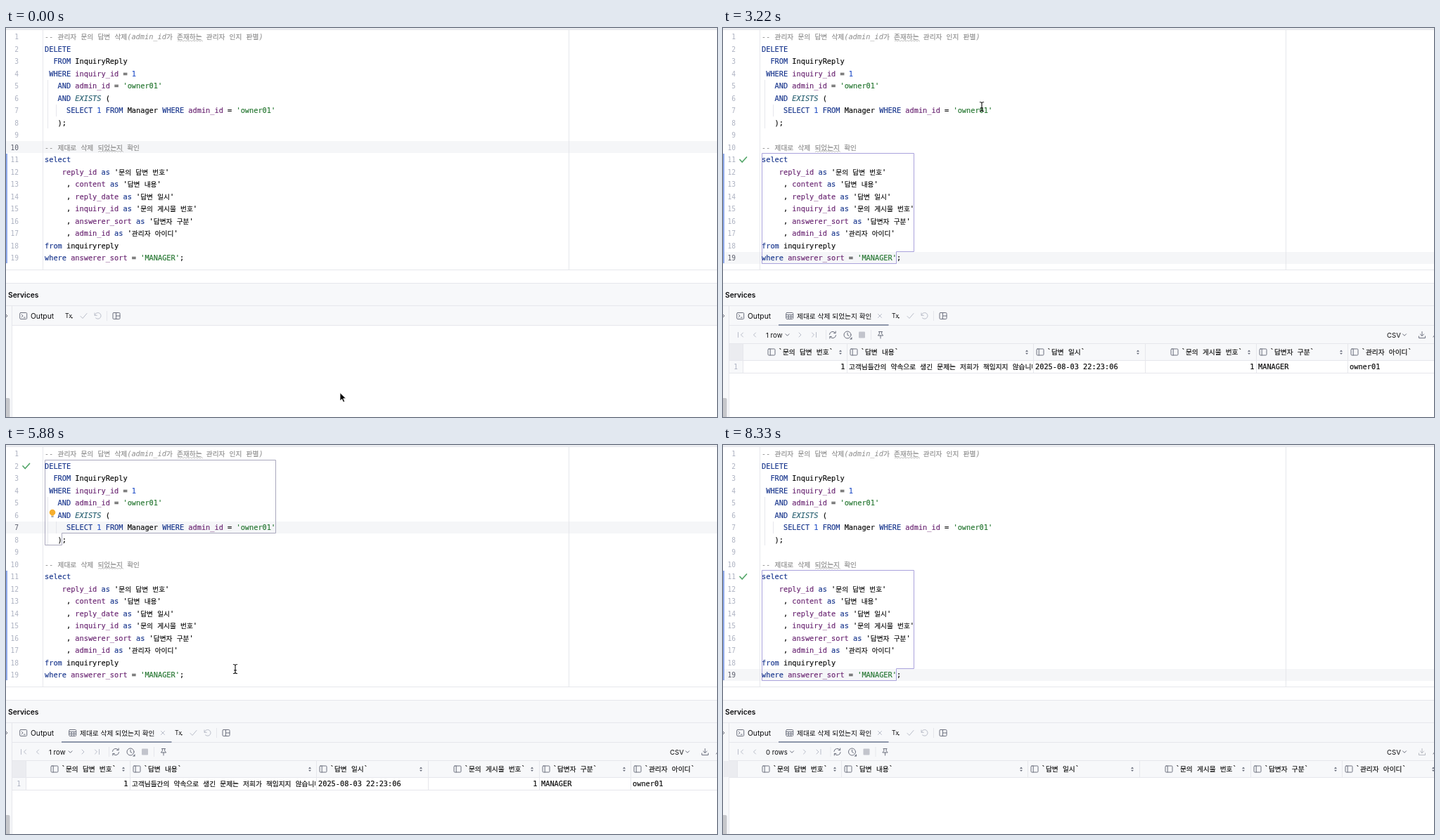
Animation of 1011x554 px, one loop 8.82 s. Source, as an HTML page:

```html
<!DOCTYPE html>
<html lang="ko">
<head>
<meta charset="utf-8">
<title>SQL console</title>
<style>
html, body { margin: 0; width: 100%; height: 100%; overflow: hidden; background: #fff; }
svg { display: block; width: 1011px; height: 554px; }
text { white-space: pre; }
.mono { font: 10.29px "DejaVu Sans Mono", "Noto Sans Mono", monospace; color: #080808; }
.mono, .mono tspan { fill: currentColor; stroke: currentColor; stroke-width: .15; }
.ui { font: 10.3px Inter, sans-serif; fill: #0c0c0e; }
.bold { font-weight: 600; }
.ko { font-family: "Noto Sans CJK KR", "Noto Sans CJK JP", "Noto Sans CJK", sans-serif; font-size: 9.67px; font-style: normal; font-weight: 500; }
.mono .kw { color: #16348c; }
.mono .col { color: #692471; }
.mono .str { color: #23752f; }
.mono .num { color: #2450c8; }
.mono .fn { color: #265f70; font-style: italic; }
.mono .note { color: #8c8c8c; font-style: italic; stroke: none; }
.note .ko { font-weight: 400; }
.mono.no { font-size: 9.6px; color: #aeb3c2; text-anchor: end; stroke: none; }
.mono.no.on { color: #5a5d6b; }
.icon { fill: none; stroke: #6c707e; stroke-width: 1; stroke-linecap: round; stroke-linejoin: round; }
.dim { stroke: #b9bdc9; }
.rule { fill: none; stroke: #e6e7ec; }
</style>
</head>
<body>
<svg id="stage" viewBox="0 0 1011 554" xmlns="http://www.w3.org/2000/svg"></svg>
<script>
const W = 1011, H = 554, LOOP = 8820, STEP = 70, ROW = 17.5;
const USER = 'owner01';
const stage = document.getElementById('stage');

const lines = [
  '-- 관리자 문의 답변 삭제(admin_id가 존재하는 관리자 인지 판별)',
  'DELETE',
  '  FROM InquiryReply',
  ' WHERE inquiry_id = 1',
  `   AND admin_id = '${USER}'`,
  '   AND EXISTS (',
  `     SELECT 1 FROM Manager WHERE admin_id = '${USER}'`,
  '   );',
  '',
  '-- 제대로 삭제 되었는지 확인',
  'select',
  "    reply_id as '문의 답변 번호'",
  "     , content as '답변 내용'",
  "     , reply_date as '답변 일시'",
  "     , inquiry_id as '문의 게시물 번호'",
  "     , answerer_sort as '답변자 구분'",
  "     , admin_id as '관리자 아이디'",
  'from inquiryreply',
  "where answerer_sort = 'MANAGER';"
];

// Markup helpers
const korean = s => s.replace(/[가-힣]+/g, '<tspan class="ko">$&</tspan>');
const text = (x, y, s, cls = 'ui', extra = '') =>
  `<text x="${x}" y="${y}" class="${cls}" ${extra}>${korean(s)}</text>`;
const rect = (x, y, w, h, fill, extra = '') =>
  `<rect x="${x}" y="${y}" width="${w}" height="${h}" fill="${fill}" ${extra}/>`;
const path = (d, cls = 'icon', extra = '') => `<path d="${d}" class="${cls}" ${extra}/>`;
const group = (id, body, extra = '') => `<g id="${id}" ${extra}>${body}</g>`;
const at = (x, y, body) => `<g transform="translate(${x} ${y})">${body}</g>`;
const hline = (y, x = 0, w = W) => path(`M${x} ${y}h${w}`, 'rule');
const vline = (x, y, h) => path(`M${x} ${y}v${h}`, 'rule');
const mid = n => 12.5 + ROW * (n - 1);

const rules = [
  [/^--.*/, 'note'],
  [/^'[A-Za-z0-9]+'/, 'str'],
  [/^'[^']*'/, ''],
  [/^EXISTS\b/, 'fn'],
  [/^(DELETE|FROM|WHERE|AND|SELECT|select|as|from|where)\b/, 'kw'],
  [/^(\w+_(id|date|sort)|content)\b/, 'col'],
  [/^\d+/, 'num'],
  [/^\w+/, ''],
  [/^[^\w']/, '']
];

function paint(line) {
  let out = '';
  while (line) {
    const [re, cls] = rules.find(r => r[0].test(line));
    const token = line.match(re)[0];
    out += cls ? `<tspan class="${cls}">${korean(token)}</tspan>` : korean(token);
    line = line.slice(token.length);
  }
  return out;
}

function squiggle(x, y, w) {
  let d = `M${x} ${y}`;
  for (let i = 0; i < w / 2; i++) d += `l2 ${i % 2 ? 1.4 : -1.4}`;
  return path(d, 'rule', 'style="stroke:#b4b4b4;stroke-width:.8"');
}

// Icons, each centred on its origin
const gridIcon = '<rect x="-5" y="-4.5" width="10" height="9" rx="1.2" class="icon"/>';
const columnIcon = gridIcon + path('M-1.8 -4.5v9');
const tableIcon = gridIcon + path('M-5 -1.5h10M-5 1.5h10M-1.5 -1.5v6M2 -1.5v6');
const layoutIcon = gridIcon + path('M-.5 -4.5v9M-.5 0h5.5');
const outputIcon = gridIcon + path('M-2.6 -2l2 2l-2 2M.6 2.2h2');
const tickIcon = path('M-4 .5l3 3l6 -7', 'icon dim', 'stroke-width="1.2"');
const undoIcon = path('M-4.5 -4v3.3h3.3M-4.2 -1a4.4 4.4 0 1 1 1.2 4', 'icon dim');
const chevron = path('M-2.5 -1.2l2.5 2.5l2.5 -2.5');
const sorter = '<path d="M-2 -.9l2 -2.3l2 2.3zM-2 .9l2 2.3l2 -2.3z" fill="#6c707e"/>';
const refresh = path('M-4.6 -.6a4.6 4.6 0 0 1 8.4 -2M4.6 .6a4.6 4.6 0 0 1 -8.4 2M4.2 -5v2.6h-2.6M-4.2 5v-2.6h2.6');
const clock = '<circle r="5" class="icon"/>' + path('M0 -2.8v3l2 1.2') +
  '<path d="M6.5 3v3.5h-3.5z" fill="#6c707e"/>';
const pin = path('M-2.5 -4.5h5M-1.7 -4.5v3.3l-2 2.2h7.4l-2 -2.2v-3.3M0 1v4');
const download = path('M0 -4.5v6M-2.6 -1l2.6 2.6l2.6 -2.6M-4.5 2v2.5h9v-2.5');
const check = path('M-4.5 0l3.2 3.5l6.3 -7', 'icon', 'style="stroke:#55a76a;stroke-width:1.7"');
const bulb = '<circle r="4.3" cy="-1" fill="#f5ae2e"/>' + rect(-1.8, 2.6, 3.6, 1, '#f5ae2e') +
  rect(-1.6, 4.4, 3.2, 1.2, '#6c707e');

const txTools = at(84, 410, text(0, 3.4, 'Tx', 'ui', 'style="font-size:8.8px"') +
  '<path d="M8.4 2h2.8l-1.4 2z" fill="#333"/>') +
  at(110, 410, tickIcon) + at(130.5, 410, undoIcon) +
  vline(143.5, 403, 14) + at(157, 410, layoutIcon);

function statementPopup(x, y, items, chosen) {
  const end = 31 + items.length * 19, h = end + 22, clip = `clip${x}`;
  return at(x, y,
    `<clipPath id="${clip}"><rect width="332" height="${h}" rx="5"/></clipPath>` +
    rect(0, 0, 332, h, '#fff', 'rx="5" filter="url(#shade)" stroke="#cfd0d6" stroke-width="1"') +
    `<g clip-path="url(#${clip})">` +
    text(167.5, 19.8, 'Statements', 'ui bold', 'text-anchor="middle"') +
    rect(0, 31 + chosen * 19, 332, 19, '#d4e2ff') +
    items.map((s, i) => text(1, 44.4 + i * 19, s)).join('') +
    rect(0, end + 6, 332, 16, '#f7f8fa') +
    text(2.5, end + 17.5, 'Customize', 'ui', 'style="fill:#315fbd"') + '</g>');
}

const wholeScript = '-- 관리자 문의 답변 삭제(admin_id가 존재하는 관리자 인지 판별) DELETE F...';

function pager(id, label, shift) {
  return group(id, text(61, 440.7, label, 'ui', 'style="font-size:9.6px"') +
    at(shift, 437, at(91.5, 0, chevron) +
      path('M108 -3l3 3l-3 3M126.5 -3l3 3l-3 3M132.5 -3.5v7', 'icon dim') +
      path('M146.5 -7v14M210.5 -7v14', 'rule') +
      at(156, 0, refresh) + at(177, 0, clock) +
      rect(193, -4.5, 9, 9, '#c2c4cc', 'rx="1"') + at(224, 0, pin)));
}

// Column: left edge, icon centre, name, sort mark
const columns = [
  [28, 69, '문의 답변 번호', 167], [176, 186, '답변 내용', 432], [441, 451, '답변 일시', 590],
  [600, 642, '문의 게시물 번호', 748], [758, 768, '답변자 구분', 879], [888, 898, '관리자 아이디', 1018]
];
const header = rect(9, 450, 19.5, 23, '#ebecf0') + columns.map(([x, icon, name, sort]) =>
  vline(x + .5, 450, 23) + at(icon, 461.5, columnIcon) +
  text(icon + 9.7, 465.3, '`' + name + '`', 'mono') + at(sort, 461.8, sorter)).join('');

const record = rect(9, 474, 19, 17, '#f7f8fa') + hline(491.5, 9) +
  columns.map(c => vline(c[0] + .5, 474, 17)).join('') +
  text(21, 486.2, '1', 'mono no') +
  text(173.5, 486.3, '1', 'mono', 'text-anchor="end"') +
  '<clipPath id="cell"><rect x="177" y="474" width="263" height="17"/></clipPath><g clip-path="url(#cell)">' +
  text(179, 486.3, '고객님들간의 약속으로 생긴 문제는 저희가 책임지지 않습니다', 'mono') + '</g>' +
  text(444, 486.3, '2025-08-03 22:23:06', 'mono') +
  text(755.5, 486.3, '1', 'mono', 'text-anchor="end"') +
  text(761, 486.3, 'MANAGER', 'mono') + text(891, 486.3, USER, 'mono');

const spokes = Array.from({ length: 8 }, (_, i) =>
  `<path d="M0 -5v-4.5" stroke="#8f939e" stroke-width="2.2" stroke-linecap="round" opacity="${.25 + i * .09}" transform="rotate(${i * 45})"/>`).join('');

const editor =
  rect(0, 0, W, 2, '#eceef1') + hline(2.5) +
  rect(0, 0, W, 17, '#f5f6f8', 'id="band"') +
  group('pickTop', rect(55, 21, W - 55, 105, '#ccccff') + rect(55, 126, 25, 17, '#ccccff')) +
  group('pickLow', rect(55, 178, W - 55, 141, '#ccccff') + rect(55, 319, 192, 17, '#ccccff')) +
  vline(52.5, 3, 341) + vline(800.5, 3, 341) + hline(344.5) +
  vline(59.5, 74, 69) + vline(71.5, 109, 17) +
  path('M55.5 21.5h328v104h-304v17h-24z', 'rule', 'id="frameTop" style="stroke:#a9a8bd"') +
  path('M55.5 178.5h216v140h-25v17h-191z', 'rule', 'id="frameLow" style="stroke:#aaa3dc"') +
  rect(0, 179, 2, 156, '#8fa9ea') +
  lines.map((s, i) => {
    const y = mid(i + 1) + 3.8;
    return text(18, y, String(i + 1), 'mono no', `id="no${i + 1}"`) +
      `<text x="55" y="${y}" class="mono">${paint(s)}</text>`;
  }).join('') +
  squiggle(244, 19, 36) + squiggle(131, 176.5, 36) +
  group('checkTop', check, 'transform="translate(28.5 30)"') +
  group('checkLow', check, 'transform="translate(28.5 187.5)"') +
  group('bulb', bulb, 'transform="translate(66 97)"');

const services =
  rect(0, 363, W, 61, '#f7f8fa') + hline(363.5) + hline(395.5) +
  rect(0, 424, 8, 130, '#f7f8fa') + vline(8.5, 396, 158) + hline(423.5, 9) +
  rect(-3, 527, 8.5, 30, '#c6c7cb', 'rx="2"') +
  path('M0 408l2 2l-2 2') +
  text(3, 383.7, 'Services', 'ui bold') +
  at(24.7, 410, outputIcon) + text(35, 413.7, 'Output') +
  group('tools', txTools) +
  group('tab', at(94.7, 410, tableIcon) + text(105, 413.7, '제대로 삭제 되었는지 확인') +
    path('M220.5 407.5l5 5m0 -5l-5 5', 'icon dim')) +
  group('grid', rect(9, 424, W, 50, '#f7f8fa') + hline(423.5, 9) + rect(79, 422, 156.5, 2, '#8d96aa') +
    hline(449.5, 9) + hline(473.5, 9) +
    path('M21.5 433.5v7M28.5 434l-3 3l3 3M46.5 434l-3 3l3 3', 'icon dim') +
    pager('onePage', '1 row', 0) + pager('noPage', '0 rows', 6.5) +
    text(944, 440.7, 'CSV', 'ui', 'style="font-size:9.6px"') + at(969, 437, chevron) +
    group('save', download, 'transform="translate(994 437)"') +
    path('M1010 440l2 -3') + group('header', header) + group('record', record)) +
  group('spinner', spokes);

stage.innerHTML =
  '<defs><filter id="shade" x="-10%" y="-25%" width="120%" height="150%">' +
  '<feDropShadow dx="0" dy="2" stdDeviation="4.5" flood-color="#000" flood-opacity=".25"/></filter></defs>' +
  rect(0, 0, W, H, '#fff') + editor + services +
  group('popLow', statementPopup(253, 336,
    ["select reply_id as '문의 답변 번호' , content as '답변 내용'...", wholeScript], 0)) +
  group('popTop', statementPopup(384, 126,
    [`SELECT 1 FROM Manager WHERE admin_id = '${USER}'`,
     'DELETE FROM InquiryReply WHERE inquiry_id = 1 AND ...', wholeScript], 1)) +
  group('pointer', '<path d="M0 0v11.5l2.7 -2.5l1.9 4.3l2 -.9l-1.9 -4.2h3.7z" fill="#000" stroke="#fff" stroke-width=".8"/>') +
  group('beam', path('M-2.6 -6.5q2.6 0 2.6 1.7v9.6q0 1.7 -2.6 1.7M2.6 -6.5q-2.6 0 -2.6 1.7M0 4.8q0 1.7 2.6 1.7M-1.5 1.8h3',
    'icon', 'style="stroke:#222;stroke-width:1.2"'));

const el = {};
stage.querySelectorAll('[id]').forEach(e => el[e.id] = e);
const show = (id, on) => el[id].style.display = on ? '' : 'none';
const move = (id, x, y) => el[id].setAttribute('transform', `translate(${x} ${y})`);
const within = (t, a, b) => t >= a && t < b;

// Mouse route: time, x, y
const route = [
  [0, 475, 519.5], [700, 251, 327],
  [2800, 251, 327], [3220, 368, 112], [3430, 406, 88], [3710, 391, 117],
  [5110, 391, 117], [5320, 390, 88], [5880, 326, 319], [6020, 251, 327],
  [8050, 251, 327], [8260, 372, 505]
];

function mouseAt(t) {
  const i = route.findIndex(k => k[0] > t);
  if (i < 0) return route[route.length - 1].slice(1);
  const [t0, x0, y0] = route[i - 1], [t1, x1, y1] = route[i];
  const p = (t - t0) / (t1 - t0), e = p * p * (3 - 2 * p);
  return [x0 + (x1 - x0) * e, y0 + (y1 - y0) * e];
}

function draw(time) {
  const t = Math.floor(time / STEP) * STEP;

  const current = t < 700 ? 10 : within(t, 3710, 6020) ? 7 : 19;
  el.band.setAttribute('y', Math.round(mid(current) - 8.75));
  lines.forEach((_, i) => el['no' + (i + 1)].classList.toggle('on', i + 1 === current));

  const topFrame = within(t, 3990, 6370);
  show('frameTop', topFrame);
  show('frameLow', t >= 1190 && !topFrame);

  const low = within(t, 1400, 1820) || within(t, 6860, 7210);
  const top = within(t, 4270, 4690);
  show('pickLow', low);
  show('popLow', low);
  show('pickTop', top);
  show('popTop', top);
  el.frameLow.setAttribute('opacity', low ? .5 : 1);
  el.frameTop.setAttribute('opacity', top ? .5 : 1);

  const topCheck = within(t, 4690, 7210);
  show('checkTop', topCheck);
  show('checkLow', within(t, 2030, 4690) || t >= 7350);
  show('bulb', within(t, 5180, 6020));

  const opened = t >= 1890, empty = t >= 7490;
  show('tab', opened);
  show('grid', opened);
  move('tools', opened ? 156 : 0, 0);
  show('onePage', !empty);
  show('noPage', empty);
  show('record', t >= 2030 && !empty);
  move('header', empty ? -8 : 0, 0);
  el.save.setAttribute('opacity', empty ? .45 : 1);

  show('spinner', within(t, 1960, 2380) || within(t, 7350, 7770));
  el.spinner.setAttribute('transform', `translate(553 521) rotate(${Math.floor(t / 140) * 45})`);

  const [x, y] = mouseAt(t);
  const seen = t < 1400 || within(t, 2870, 4270) || within(t, 5180, 6860) || within(t, 8120, 8330);
  show('beam', seen && y < 344);
  show('pointer', seen && y >= 344);
  move('beam', x, y);
  move('pointer', x, y);
}

const start = performance.now();
function tick() {
  draw((performance.now() - start) % LOOP);
  requestAnimationFrame(tick);
}
tick();
</script>
</body>
</html>
```
